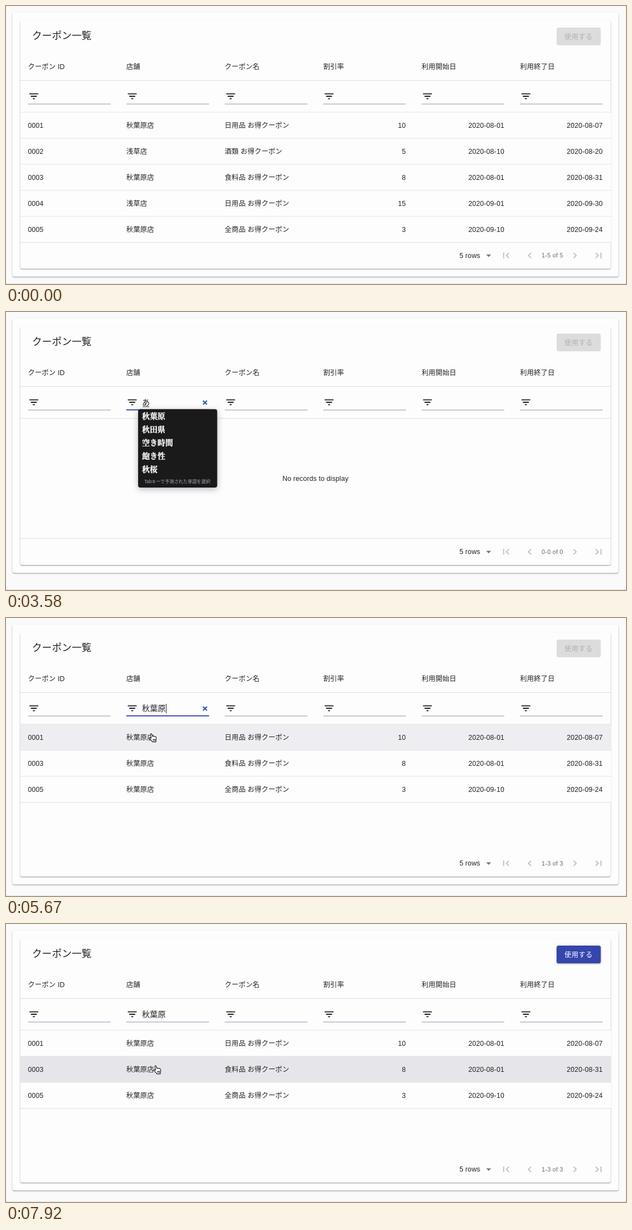
An HTML page for the animation above (8 s loop, 1117x502 px).

```html
<!DOCTYPE html>
<html lang="ja">
<head>
<meta charset="utf-8">
<title>クーポン一覧</title>
<style>
html, body { margin: 0; width: 100%; height: 100%; overflow: hidden; background: #fafafa; }
svg { display: block; width: 1117px; height: 502px; }
text {
  font: 12.4px "Liberation Sans", Arial, "Noto Sans CJK JP", "Noto Sans CJK", sans-serif;
  letter-spacing: .0107em; fill: #212121; white-space: pre;
}
.title { font-size: 17.74px; letter-spacing: .0075em; }
.input { font-size: 14.2px; letter-spacing: 0; }
.btn { letter-spacing: .0286em; }
.range { font-size: 10.64px; letter-spacing: .0333em; fill: #666; }
.word {
  font: 900 14px "Noto Serif CJK JP", "Noto Serif CJK", "Noto Serif", "Noto Sans CJK JP", serif;
  letter-spacing: 0; fill: #fff; stroke: #fff; stroke-width: .35;
}
.hint { font-size: 8.2px; letter-spacing: 0; fill: #aaa; }
.paper { fill: #fdfdfd; filter: drop-shadow(0 1px .4px rgba(0,0,20,.3)) drop-shadow(0 1px 1.5px rgba(0,0,20,.14)); }
.popup { fill: #1a1a1b; filter: drop-shadow(0 3px 6px rgba(0,0,40,.28)); }
</style>
</head>
<body>
<script>
const LOOP = 8000, STEP = 177.3, ROW_TOP = 192, ROW_H = 47;
const T = { focus: 2200, type: 2620, popup: 3080, pick: 3920, confirm: 4420, select: 5950, reselect: 7500 };
const heads = ['クーポン ID', '店舗', 'クーポン名', '割引率', '利用開始日', '利用終了日'];
const data = [
  ['0001', '秋葉原店', '日用品 お得クーポン', '10', '2020-08-01', '2020-08-07'],
  ['0002', '浅草店', '酒類 お得クーポン', '5', '2020-08-10', '2020-08-20'],
  ['0003', '秋葉原店', '食料品 お得クーポン', '8', '2020-08-01', '2020-08-31'],
  ['0004', '浅草店', '日用品 お得クーポン', '15', '2020-09-01', '2020-09-30'],
  ['0005', '秋葉原店', '全商品 お得クーポン', '3', '2020-09-10', '2020-09-24']
];
const words = ['秋葉原', '秋田県', '空き時間', '飽き性', '秋桜'];
// time, x, y of the pointer tip
const path = [
  [920, 10, 150], [1380, 163, 175.5], [1480, 163, 175.5], [2050, 290, 163],
  [5000, 290, 163], [5580, 262, 209], [6600, 262, 209], [7100, 270, 256]
];

function el(tag, attrs, parent, text) {
  const node = document.createElementNS('http://www.w3.org/2000/svg', tag);
  for (const k in attrs) node.setAttribute(k, attrs[k]);
  if (text !== undefined) node.textContent = text;
  parent.appendChild(node);
  return node;
}
const label = (x, y, text, parent, attrs = {}) => el('text', { x, y, ...attrs }, parent, text);
const line = (y, parent) => el('rect', { x: 26, y: y - .5, width: 1064, height: 1, fill: '#dcdcde' }, parent);
const icon = (cx, cy, d, fill, parent) =>
  el('path', { d, fill, transform: `translate(${cx - 10.64} ${cy - 10.64}) scale(.887)` }, parent);
const show = (node, on) => node.setAttribute('visibility', on ? 'visible' : 'hidden');
const set = (node, attrs) => { for (const k in attrs) node.setAttribute(k, attrs[k]); };
const clamp = v => Math.max(0, Math.min(1, v));
const ease = v => { v = clamp(v); return v * v * (3 - 2 * v); };
const mix = (a, b, p) => `rgb(${a.map((v, i) => Math.round(v + (b[i] - v) * p))})`;

const svg = el('svg', { viewBox: '0 0 1117 502' }, document.body);
el('rect', { width: 1117, height: 502, fill: '#fafafa' }, svg);
el('rect', { y: 501, width: 1117, height: 1, fill: '#e0e0dc' }, svg);
const outer = el('rect', { x: 11.5, y: 12, width: 1092, height: 477, rx: 3.5, class: 'paper' }, svg);
const inner = el('rect', { x: 25.5, y: 26, width: 1064, height: 448, rx: 3.5, class: 'paper' }, svg);

// Toolbar and column heads
label(47, 60.3, 'クーポン一覧', svg, { class: 'title' });
const btn = el('rect', { x: 992, y: 39, width: 79.5, height: 32, rx: 3.5 }, svg);
const btnText = label(1006, 59.6, '使用する', svg, { class: 'btn' });
line(134.5, svg);
line(192, svg);
heads.forEach((name, i) => {
  const x = 39.5 + i * STEP;
  label(x, 113.5, name, svg);
  icon(x + 10.64, 163, 'M10 18h4v-2h-4zM3 6v2h18V6zm3 7h12v-2H6z', '#1c1c1c', svg);
  el('rect', { x, y: 176.5, width: 149, height: 1, fill: '#9292ac' }, svg);
});

// Filter field
const focusBar = el('rect', { y: 175.7, height: 1.8, fill: '#3047ae' }, svg);
const input = label(245, 168.3, '', svg, { class: 'input' });
const compose = el('rect', { x: 246, y: 170.5, height: 1, fill: '#222' }, svg);
const caret = el('rect', { y: 155, width: 1, height: 17, fill: '#222' }, svg);
const clear = el('path', { d: 'M355 160l7 7m0-7l-7 7', stroke: '#2c5cab', 'stroke-width': 2.4 }, svg);

// Table body
const rows = data.map(cells => {
  const g = el('g', {}, svg);
  const bg = el('rect', { x: 26, y: .5, width: 1064, height: 46 }, g);
  cells.forEach((text, i) => {
    const right = i > 2;
    label(39.5 + i * STEP + (right ? 149 : 0), 28, text, g, { 'text-anchor': right ? 'end' : 'start' });
  });
  line(47, g);
  return { g, bg };
});
const empty = el('g', {}, svg);
label(557.5, 305, 'No records to display', empty, { 'text-anchor': 'middle' });
line(409, empty);

// Pager, placed relative to its centre line
const pager = el('g', {}, svg);
const faint = '#bdbdbd';
label(817, 4.2, '5 rows', pager);
icon(869.5, 0, 'M7 10l5 5 5-5z', '#757575', pager);
icon(901, 0, 'M18.41 16.59L13.82 12l4.59-4.59L17 6l-6 6 6 6zM6 6h2v12H6z', faint, pager);
icon(943.5, 0, 'M15.41 7.41L14 6l-6 6 6 6 1.41-1.41L10.83 12z', faint, pager);
const range = label(965, 3.7, '', pager, { class: 'range' });
icon(1025, 0, 'M10 6L8.59 7.41 13.17 12l-4.58 4.59L10 18l6-6z', faint, pager);
icon(1067.5, 0, 'M5.59 7.41L10.18 12l-4.59 4.59L7 18l6-6-6-6zM16 6h2v12h-2z', faint, pager);

// Word suggestions
const popup = el('g', {}, svg);
el('rect', { x: 238, y: 175.5, width: 142.5, height: 141.5, rx: 4, class: 'popup' }, popup);
words.forEach((w, i) => label(245, 193.2 + i * 24, w, popup, { class: 'word' }));
label(249, 308.8, 'Tabキーで予測された単語を選択', popup, { class: 'hint' });

// Pointers, tip at the origin
const pointers = {
  arrow: el('path', {
    d: 'M0 0V12.4L2.8 9.8 4.7 14 6.9 13 5 8.9H8.8Z',
    fill: '#000', stroke: '#fff', 'stroke-width': .9
  }, svg),
  beam: el('path', {
    d: 'M-3 -7.5Q0 -7.5 0 -5.5Q0 -7.5 3 -7.5M0 -5.5V5.5M-3 7.5Q0 7.5 0 5.5Q0 7.5 3 7.5M-1.5 1H1.5',
    fill: 'none', stroke: '#222', 'stroke-width': 1
  }, svg),
  hand: el('path', {
    d: 'M-1.6 1Q-1.4 -.4 -.2 0Q.6 .3 .9 1.5L2 5Q2.6 3.6 4.2 4.8Q5.2 3.8 6.3 5.3Q7.7 4.6 8.4 6.4Q9.4 9 8.2 11.6L8 14.6H2L-.4 11.8L-4 8.2Q-4.4 6.6 -2.7 6.9L-.4 8.2ZM3.2 9.5V12.5M5 9.5V12.5M6.7 9.5V12.5',
    fill: '#fff', stroke: '#111', 'stroke-width': 1.1, 'stroke-linejoin': 'round'
  }, svg)
};

function pointerAt(t) {
  if (t < path[0][0] || (t >= T.type && t < 5000)) return null;
  let i = path.length - 1;
  while (path[i][0] > t) i--;
  const a = path[i], b = path[i + 1] || a;
  const p = b === a ? 0 : ease((t - a[0]) / (b[0] - a[0]));
  const x = a[1] + (b[1] - a[1]) * p, y = a[2] + (b[2] - a[2]) * p;
  const kind = y > ROW_TOP ? 'hand' : y < 176 && x > 244 && x < 366 ? 'beam' : 'arrow';
  return { x, y, kind };
}

function drawTable(t, ptr) {
  const ids = t < T.type ? [0, 1, 2, 3, 4] : t < T.pick ? [] : [0, 2, 4];
  const bottom = { 5: 474.5, 0: 457, 3: 467 }[ids.length];
  const hover = ptr && ptr.y > ROW_TOP ? Math.floor((ptr.y - ROW_TOP) / ROW_H) : -1;
  const chosen = t < T.select ? -1 : t < T.reselect ? 0 : 1;
  rows.forEach((row, i) => {
    const n = ids.indexOf(i);
    show(row.g, n >= 0);
    if (n < 0) return;
    row.g.setAttribute('transform', `translate(0 ${ROW_TOP + n * ROW_H})`);
    const fill = n === chosen ? '#e6e6ea' : n === hover ? (n ? '#f2f2ef' : '#eeeef2') : '#fdfdfd';
    row.bg.setAttribute('fill', fill);
  });
  show(empty, !ids.length);
  inner.setAttribute('height', bottom - 26);
  outer.setAttribute('height', bottom + 2.2);
  pager.setAttribute('transform', `translate(0 ${bottom - 24})`);
  range.textContent = `${ids.length ? 1 : 0}-${ids.length} of ${ids.length}`;
}

function drawField(t) {
  const focused = t >= T.focus && t < T.select;
  const text = t < T.type ? '' : t < T.pick ? 'あ' : '秋葉原';
  const width = text.length * 14.2;
  const grow = ease((t - T.focus) / 200) - ease((t - T.select) / 200);
  input.textContent = text;
  set(focusBar, { x: 291.3 - 74.5 * grow, width: 149 * grow });
  show(compose, t >= T.type && t < T.confirm);
  compose.setAttribute('width', Math.max(0, width - 2));
  const last = [T.confirm, T.pick, T.type, T.focus].find(k => t >= k);
  show(caret, focused && Math.floor((t - last) / 500) % 2 === 0);
  caret.setAttribute('x', 245.5 + width);
  show(clear, focused && text);
  show(popup, t >= T.popup && t < T.pick);
}

function draw(t) {
  const ptr = pointerAt(t);
  drawTable(t, ptr);
  drawField(t);
  const on = ease((t - T.select) / 250);
  btn.setAttribute('fill', mix([220, 220, 220], [53, 70, 172], on));
  btn.style.filter = `drop-shadow(0 1.5px 1.5px rgba(0,0,0,${.35 * on}))`;
  btnText.style.fill = mix([176, 176, 176], [255, 255, 255], on);
  for (const kind in pointers) {
    const here = ptr && ptr.kind === kind;
    show(pointers[kind], here);
    if (here) pointers[kind].setAttribute('transform', `translate(${ptr.x} ${ptr.y})`);
  }
}

const start = performance.now();
function tick(now) {
  draw(Math.max(0, now - start) % LOOP);
  requestAnimationFrame(tick);
}
draw(0);
requestAnimationFrame(tick);
</script>
</body>
</html>
```
